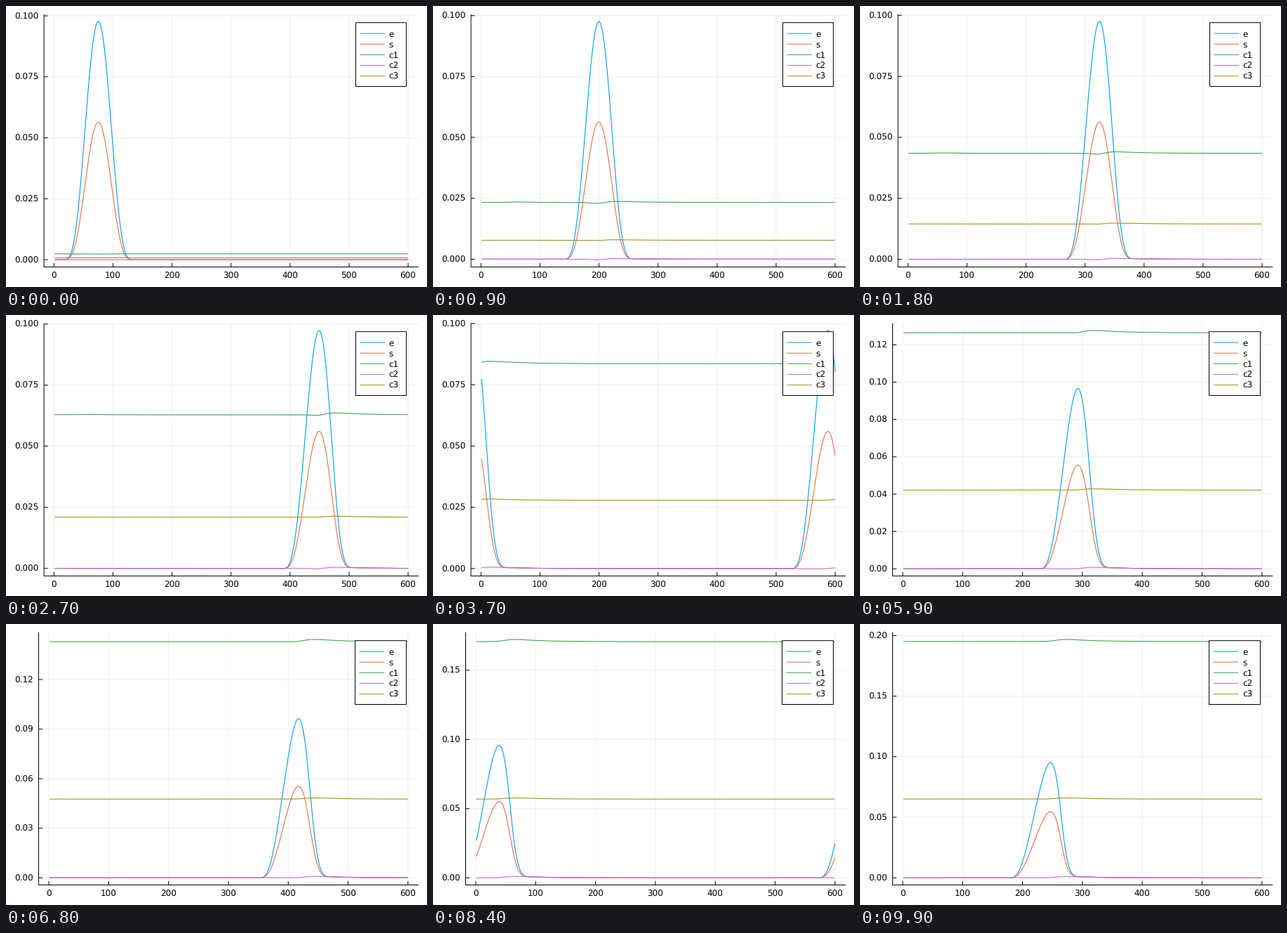
A matplotlib script that plays this animation: 600 by 400 pixels, repeating every 10000 ms.

```python
import numpy as np
import matplotlib.pyplot as plt
from matplotlib.animation import FuncAnimation
from matplotlib.patches import Rectangle

W, H, DPI = 600, 400, 100
FRAMES, INTERVAL = 100, 100
TOP, BOTTOM, RIGHT = 11.81, 371.5, 588.19
CELLS = 600
SPEED = 24 / np.sqrt(3)
NAMES = ["e", "s", "c1", "c2", "c3"]
COLORS = ["#009AFA", "#E36F47", "#3EA44E", "#C371D2", "#AC8E18"]
PX = 72 / DPI

plt.rcParams.update({"font.family": "DejaVu Sans", "path.snap": False,
                     "text.hinting": "none", "text.hinting_factor": 1})

x = np.arange(1, CELLS + 1)
theta = np.linspace(-60, 60, 400)
bump = (1 - (theta / 60) ** 2) ** 4

fig = plt.figure(figsize=(W / DPI, H / DPI), dpi=DPI, facecolor="white")
ax = fig.add_axes([0, 0, 1, 1])


def fields(n):
    """The five curves at step n: a steepening pulse on a ring of cells."""
    u = (x - 75 - SPEED * n + 300) % CELLS - 300
    lean = 0.11 * n
    pulse = np.interp(u, theta - lean * (1 - bump), bump, left=0, right=0)
    peak = 0.0977 - 6.5e-6 * n - 2e-7 * n**2

    front = 1 / (1 + np.exp(-(u - 9) / 7))
    decay = np.exp(-8 / 45 * np.logaddexp(0, (u - 26) / 8))
    wake = 0.0021 * (n / 99) ** 0.6 * front * decay
    fade = np.exp(-n / 40)
    grow = 1 - np.exp(-n / 6)
    dip = (0.0007 * grow + 0.00006) * fade * np.exp(-((u + 2) / 15) ** 2)
    rest = 0.0003 * grow * fade * np.exp(-((x - 62) / 22) ** 2)
    wiggle = wake - dip

    level = 0.0024 + 0.5811 * (1 - np.exp(-0.00407 * n))
    ahead = wake * (1 - pulse)
    e = peak * pulse + 0.8 * ahead
    s = peak * (0.577 - 2.6e-5 * n) * pulse + 0.7 * ahead
    return [e, s, level + wiggle + rest, 0.65 * wiggle, level / 3 + 0.55 * wake - 0.25 * dip]


def nice_ticks(lo, hi):
    """Best-scoring ticks within the limits, and their number of decimals."""
    best, ticks, digits = -1, None, 2
    for step, nice in [(0.1, 1), (0.05, 0.9), (0.02, 0.7), (0.025, 0.5), (0.03, 0.2)]:
        k = int(hi / step) + 1
        if not 4 <= k <= 8:
            continue
        fit = 0.5 * (hi - lo) / ((k - 1) * step)
        score = 0.25 * (1 - abs(k - 5) / 5) + 0.25 * nice + fit
        if score >= best - 1e-9:
            best, ticks, digits = score, np.arange(k) * step, 3 if step == 0.025 else 2
    return ticks, digits


def line(xs, ys, color="black", width=1.0, **kw):
    ax.plot(xs, ys, color=color, lw=width * PX, solid_capstyle="butt", snap=False, **kw)


def label(px, py, text, ha):
    ax.text(px, py + 4.4, text, ha=ha, va="baseline", fontsize=12 * PX, zorder=8)


def draw_legend(left):
    ax.add_patch(Rectangle((left, 23.7), 570.5 - left, 90.8, fc="white", ec="black",
                           lw=PX, snap=False, zorder=6))
    for i, (name, color) in enumerate(zip(NAMES, COLORS)):
        y = 39.14 + 15.12 * i
        line([left + 6, left + 41.5], [y, y], color, zorder=7)
        label(545, y, name, "left")


def draw(n):
    ax.clear()
    ax.set(xlim=(0, W), ylim=(H, 0))
    ax.axis("off")

    curves = fields(n)
    lo, hi = np.min(curves), np.max(curves)
    pad = 0.03 * (hi - lo)
    lo, hi = lo - pad, hi + pad
    ticks, digits = nice_ticks(lo, hi)
    left = 54.15 if digits == 3 else 46.52
    margin = 0.03 * (CELLS - 1)

    def to_x(v):
        return left + (v - 1 + margin) / (CELLS - 1 + 2 * margin) * (RIGHT - left)

    def to_y(v):
        return BOTTOM - (v - lo) / (hi - lo) * (BOTTOM - TOP)

    for v in range(0, 601, 100):
        px = to_x(v)
        line([px, px], [TOP, BOTTOM], "#EFEFEF", zorder=1)
        line([px, px], [BOTTOM, BOTTOM - 5.5], zorder=5)
        label(px, 383, str(v), "center")
    for v in ticks:
        py = to_y(v)
        line([left, RIGHT], [py, py], "#EFEFEF", zorder=1)
        line([left, left + 5.5], [py, py], zorder=5)
        label(left - 7.6, py, f"{v:.{digits}f}", "right")

    line([left, left], [TOP, BOTTOM + 0.5], zorder=5)
    line([left - 0.5, RIGHT], [BOTTOM, BOTTOM], zorder=5)

    for values, color in zip(curves, COLORS):
        line(to_x(x), to_y(values), color, 1.1, zorder=3)

    draw_legend(498.5 if digits == 3 else 497.5)
    return []


anim = FuncAnimation(fig, draw, frames=FRAMES, interval=INTERVAL, init_func=lambda: [],
                     repeat=True, repeat_delay=0, blit=False)
plt.show()
```
